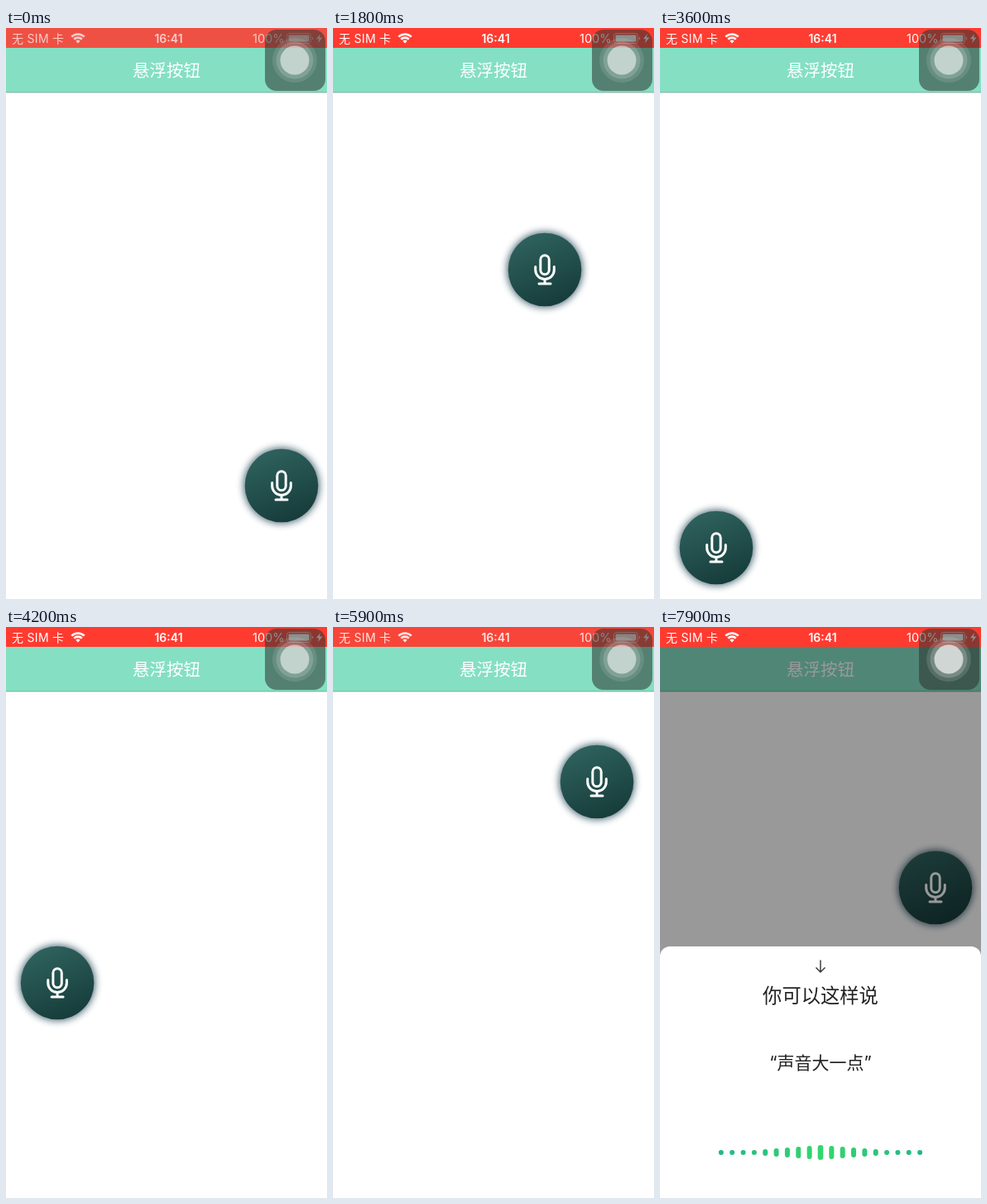
Animation, 388 px wide and 690 px high, one loop 8000 ms. Source, as an HTML page:

```html
<!DOCTYPE html>
<html lang="zh-CN">
<head>
<meta charset="utf-8">
<title>悬浮按钮</title>
<style>
  html, body { margin: 0; width: 100%; height: 100%; overflow: hidden; background: #fff; }
  svg { display: block; width: 100%; height: 100%; }
  text { font-family: Inter, "Noto Sans CJK SC", "Noto Sans CJK", sans-serif; }
  .line { fill: none; stroke: #fff; stroke-width: 3; stroke-linecap: round; }
  .mid { text-anchor: middle; }
</style>
</head>
<body>
<svg viewBox="0 0 388 690">
  <defs>
    <linearGradient id="face" x1=".3" y1="0" x2=".7" y2="1">
      <stop stop-color="#2f625e"/><stop offset="1" stop-color="#153b39"/>
    </linearGradient>
    <filter id="blur" x="-30%" y="-30%" width="160%" height="160%"><feGaussianBlur stdDeviation="4.5"/></filter>
  </defs>
  <rect width="388" height="690" fill="#fff"/>
  <rect width="388" height="78" fill="#85dfc3"/>
  <rect y="77.5" width="388" height="1" fill="#000" opacity=".25"/>
  <text class="mid" x="194" y="58.5" font-size="20.5" font-weight="500" fill="#fff">悬浮按钮</text>

  <g id="button">
    <circle r="46" fill="#1c3f50" opacity=".75" filter="url(#blur)"/>
    <circle r="44.3" fill="url(#face)"/>
    <g class="line">
      <rect x="-5.2" y="-17.3" width="10.4" height="23" rx="5.2"/>
      <path d="M-11.3-3.5v3.8a11.3 11.3 0 0 0 22.6 0v-3.8M0 11.6V17M-7 17H7"/>
    </g>
  </g>

  <rect id="dim" width="388" height="690"/>

  <g id="sheet">
    <rect width="388" height="330" rx="12" fill="#fff"/>
    <path d="M194 16.5V31M188.5 25.5l5.5 5.5 5.5-5.5" fill="none" stroke="#333" stroke-width="1.4"/>
    <text class="mid" x="194" y="67.5" font-size="23.3" fill="#222">你可以这样说</text>
    <text class="mid" x="194" y="147.5" font-size="21" fill="#222">“声音大一点”</text>
    <g id="bars"></g>
  </g>

  <rect id="status" width="388" height="24" fill="#ff3b30"/>
  <g id="info" fill="#fff">
    <text x="7" y="17.7" font-size="14" letter-spacing=".3">无 SIM 卡</text>
    <g fill="none" stroke="#fff" stroke-width="2.6">
      <path d="M79.3 10.6a11 11 0 0 1 15.4 0M82.2 13.6a6.8 6.8 0 0 1 9.6 0"/>
    </g>
    <path d="M87 18.6l-2.7-2.8a3.8 3.8 0 0 1 5.4 0z"/>
    <text class="mid" x="196.5" y="17.7" font-size="14" font-weight="600">16:41</text>
    <text x="298" y="17.7" font-size="14.5">100%</text>
    <rect x="339.5" y="6.5" width="29" height="12" rx="3" fill="none" stroke="#fff" opacity=".6"/>
    <rect x="341.5" y="8.5" width="25" height="8" rx="1.2"/>
    <path d="M370 10.5q2 2 0 4zM380 7l-5 6.2h3.4l-1.4 5 5.5-6.6h-3.6z"/>
  </g>

  <rect x="313" y="2" width="73" height="74" rx="14" fill="#2d3431" opacity=".55"/>
  <g id="touch" fill="#fff">
    <circle cx="349" cy="39" r="27" opacity=".13"/>
    <circle cx="349" cy="39" r="22.5" opacity=".2"/>
    <circle cx="349" cy="39" r="17.5" opacity=".65"/>
  </g>
</svg>
<script>
const LOOP = 8000, PULSE = 3100, SHEET_AT = 6700, SHEET_MS = 400;
const $ = id => document.getElementById(id);
const clamp = v => Math.max(0, Math.min(1, v));
const mix = (a, b, p) => a + (b - a) * p;

// Drag and edge-snap stops: time, x, y
const path = [
  [0, 333, 553], [200, 333, 553], [800, 75, 430], [1050, 55, 430], [1250, 55, 430],
  [1800, 256, 292], [2050, 333, 290], [2200, 333, 290], [2700, 70, 405], [2900, 55, 405],
  [3100, 55, 405], [3600, 68, 628], [3800, 55, 628], [4000, 55, 628], [4500, 75, 70],
  [4700, 89, 48], [5000, 60, 125], [5200, 55, 130], [5450, 55, 130], [5900, 319, 187],
  [6150, 333, 315], [LOOP, 333, 315]
];

const bars = Array.from({ length: 19 }, (_, i) => {
  const bar = document.createElementNS('http://www.w3.org/2000/svg', 'rect');
  const d = Math.abs(i - 9), w = d ? 6 : 6.6;
  bar.setAttribute('x', 194 + (i - 9) * 13.35 - w / 2);
  bar.setAttribute('width', w);
  bar.setAttribute('rx', w / 2);
  bar.setAttribute('fill', `rgb(${mix(52, 38, d / 9)},${mix(215, 183, d / 9)},${mix(110, 132, d / 9)})`);
  $('bars').append(bar);
  return { bar, gain: Math.max(0, 1 - d / 6) };
});

function position(t) {
  const i = path.findIndex(k => k[0] > t);
  const [t0, x0, y0] = path[i - 1], [t1, x1, y1] = path[i];
  const p = (t - t0) / (t1 - t0), e = p * p * (3 - 2 * p);
  return [mix(x0, x1, e), mix(y0, y1, e)];
}

function draw(t) {
  $('button').setAttribute('transform', `translate(${position(t)})`);

  const pulse = Math.cos(Math.PI * t / PULSE) ** 16;
  $('status').setAttribute('opacity', 1 - .14 * pulse);
  $('info').setAttribute('opacity', 1 - .3 * pulse);

  const left = 1 - clamp((t - SHEET_AT) / SHEET_MS);
  $('sheet').setAttribute('transform', `translate(0 ${386 + 304 * left ** 2})`);
  $('dim').setAttribute('opacity', .4 * (1 - left ** 3));
  $('touch').setAttribute('opacity', mix(.85, 1.1, 1 - left));

  const level = 12 + 9 * Math.sin(2 * Math.PI * (7900 - t) / 500);
  for (const { bar, gain } of bars) {
    const h = 6 + level * gain;
    bar.setAttribute('y', 249 - h / 2);
    bar.setAttribute('height', h);
  }
}

const start = performance.now();
function tick() {
  draw((performance.now() - start) % LOOP);
  requestAnimationFrame(tick);
}
tick();
</script>
</body>
</html>
```
